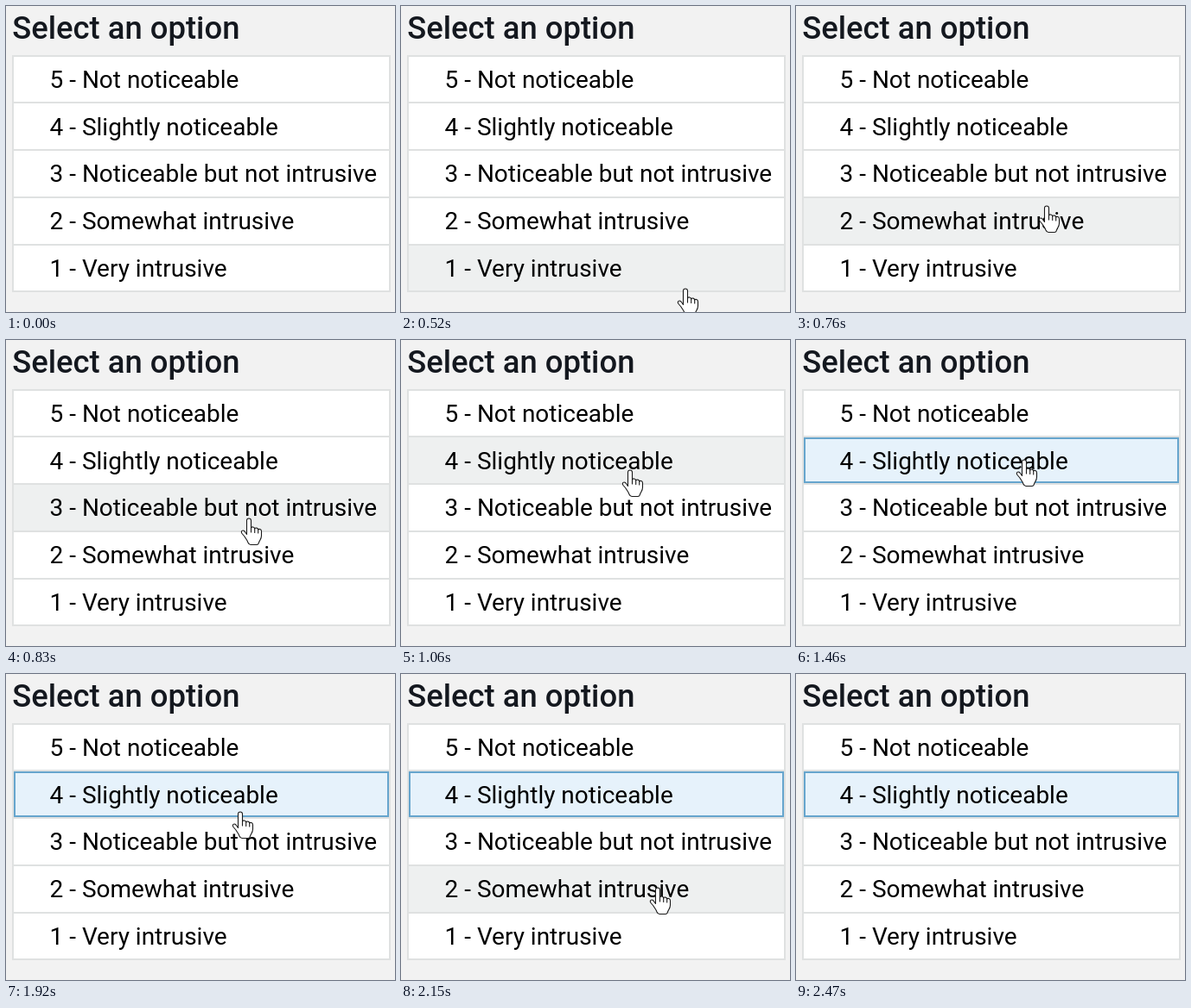
Animation of 450x355 px, one loop 2.93 s. Source, as an HTML page:

```html
<!DOCTYPE html>
<html lang="en">
<head>
<meta charset="utf-8">
<title>Select an option</title>
<style>
html, body { margin: 0; width: 100%; height: 100%; overflow: hidden; background: #f2f2f2; }
svg { display: block; }
text { font: 27.97px Roboto, sans-serif; fill: #000; }
.title { font-size: 36.4px; font-weight: 500; fill: #14181f; }
.row { fill: #fff; }
.hover { fill: #eef0f0; }
.selected { fill: #e6f2fb; }
#outline { fill: none; stroke: #66a5cd; stroke-width: 2; }
#click { fill: #ffff10; opacity: .55; }
</style>
</head>
<body>
<svg width="450" height="355" viewBox="0 0 450 355">
  <text class="title" x="7.2" y="38">Select an option</text>
  <path fill="#dfe1e1" d="M7 57H445V332H7Z"/>
  <g id="list"></g>
  <rect id="outline" x="10" y="114" width="432" height="51"/>
  <g id="hand" stroke="#1a1a1a" stroke-width="1.1" stroke-linejoin="round" stroke-linecap="round">
    <path fill="#fff" d="M-2.5 18.5V2.5C-2.5-.8 2.5-.8 2.5 2.5V11C3 9.3 6.5 9.5 6.7 12C7.5 10.5 10.5 10.8 10.7 13C11.5 12 14.5 12.2 14.5 15V20C14.5 24 12.5 25 11.5 28Q11 30.5 9 30.5H2Q0 30.5-1 28C-2 25-4 23-5 21L-8 17.5C-10 14.5-7 13-5 15Z"/>
    <path d="M2.5 11V16M6.7 12V16.5M10.7 13V17"/>
  </g>
  <circle id="click" cx="265" cy="139" r="21"/>
</svg>
<script>
const LOOP = 2930, STEP = 76.6, CLICK = 1290, SELECT = 1460, LEAVE = 2470;
const TOP = 56.7, PITCH = 54.75, CHOSEN = 1;
const labels = ["5 - Not noticeable", "4 - Slightly noticeable", "3 - Noticeable but not intrusive",
  "2 - Somewhat intrusive", "1 - Very intrusive"];

// Each move runs in whole steps along a curve through its start, middle and end
const moves = [
  { start: 520, steps: 8, x: [329, 281, 264], y: [328, 207, 139] },
  { start: 1920, steps: 6, x: [271, 297, 356], y: [160, 248, 335] }
];

const byId = id => document.getElementById(id);
const show = (id, on) => byId(id).setAttribute("visibility", on ? "visible" : "hidden");
const lineY = i => Math.round(TOP + PITCH * i);

function add(tag, attrs, text = "") {
  const el = document.createElementNS("http://www.w3.org/2000/svg", tag);
  for (const key in attrs) el.setAttribute(key, attrs[key]);
  el.textContent = text;
  return byId("list").appendChild(el);
}

const rows = labels.map((label, i) => {
  const y = lineY(i) + 2;
  const row = add("rect", { x: 9, y, width: 434, height: lineY(i + 1) - y });
  add("text", { x: 50.6, y: Math.round(TOP + PITCH * i + 38.2) }, label);
  return row;
});

const curve = ([a, b, c], u) => a * (2 * u - 1) * (u - 1) + 4 * b * u * (1 - u) + c * u * (2 * u - 1);

function pointer(t) {
  const move = moves.filter(m => m.start <= t).pop();
  if (!move || t >= LEAVE) return null;
  const u = Math.min(1, Math.floor((t - move.start) / STEP) / move.steps);
  return { x: curve(move.x, u), y: curve(move.y, u) };
}

function draw(t) {
  const tip = pointer(t), selected = t >= SELECT;
  const hovered = tip ? Math.floor((tip.y - TOP - 1) / PITCH) : -1;
  rows.forEach((row, i) => row.setAttribute("class",
    selected && i === CHOSEN ? "selected" : i === hovered ? "hover" : "row"));
  show("outline", selected);
  show("hand", tip);
  if (tip) byId("hand").setAttribute("transform", `translate(${Math.round(tip.x)} ${Math.round(tip.y)})`);
  show("click", t >= CLICK && !selected);
}

const start = performance.now();
function tick() {
  draw((performance.now() - start) % LOOP);
  requestAnimationFrame(tick);
}
tick();
</script>
</body>
</html>
```
